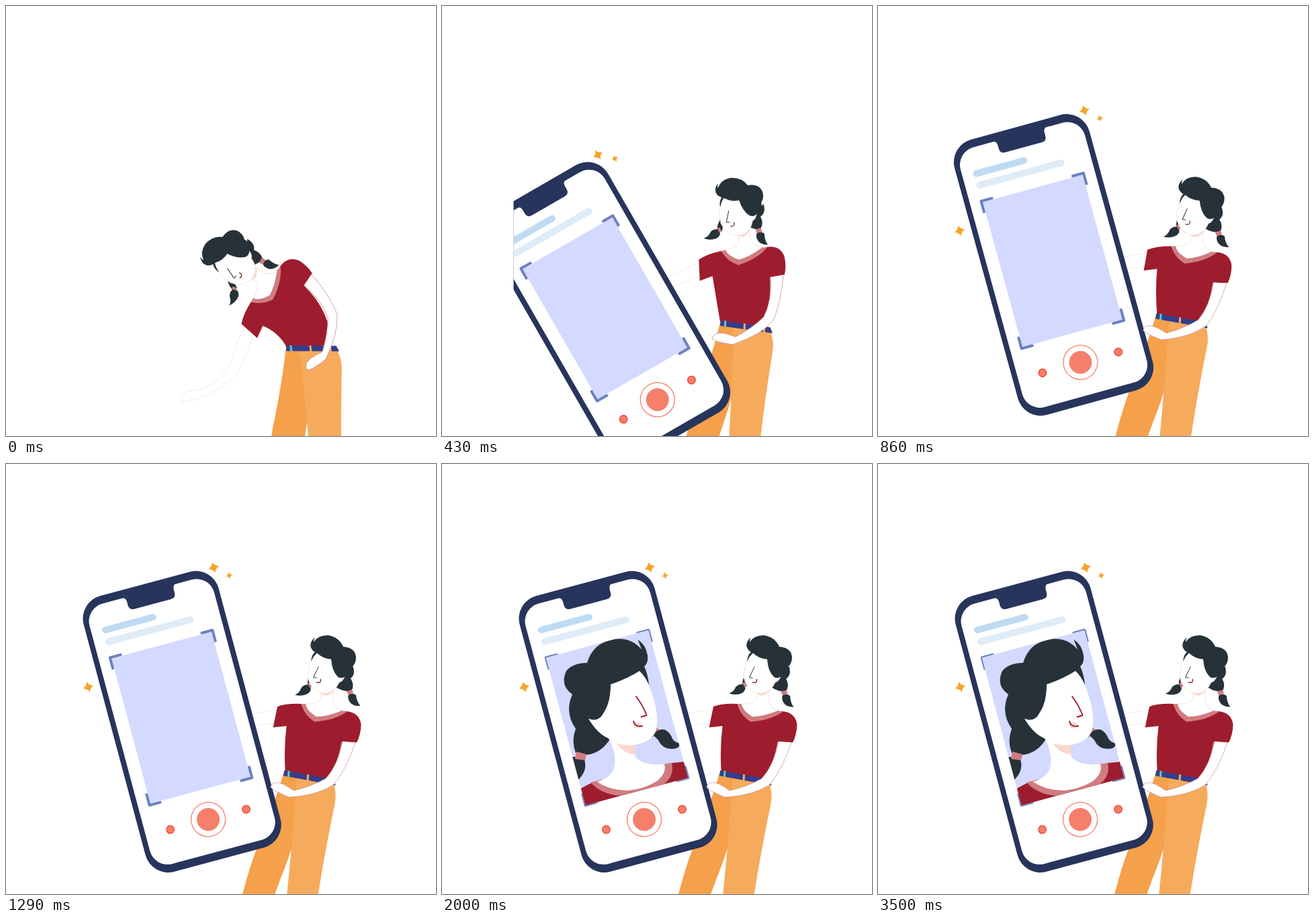
These frames come from a looping animation (640x640 px, 3570 ms). An HTML page:

```html
<!DOCTYPE html>
<html lang="en">
<head>
<meta charset="utf-8">
<title>Selfie</title>
<style>
html, body { margin: 0; height: 100%; overflow: hidden; background: #fff; }
svg { display: block; width: 100vw; height: 100vh; }
.hair { fill: #263238; }
.red { fill: #9d1d2e; }
.pink { fill: #d07c80; }
.peach { fill: #fad7cc; }
.skin { fill: #fff; stroke: #f6d3cb; stroke-width: .6; }
.line { fill: none; stroke-linecap: round; stroke-linejoin: round; }
</style>
</head>
<body>
<svg viewBox="0 0 640 640">
  <defs>
    <clipPath id="left"><rect x="106.5" width="534" height="640"/></clipPath>
    <clipPath id="frame"><rect x="-79" y="-270.5" width="158" height="227.5" transform="translate(301 529) rotate(-15)"/></clipPath>
    <path id="star" d="M0-8Q1.5-2.5 8 0Q2.5 1.5 0 8Q-1.5 2.5-8 0Q-2.5-1.5 0-8Z" fill="#f5a428"/>
  </defs>

  <g class="chest">
    <path fill="#fff" stroke="#f8e4e2" stroke-width=".8" d="M403 366Q370 370 350 376Q318 379 290 359L278 343L269 337L259 343L277 363Q318 396 350 392L397 386"/>
    <path id="shirt" class="red"/>
    <path class="pink" d="M440.5 357Q442 372 459 383.5Q488 382 507 369L500 367Q478 376 462 376Q447 367 446 357Z"/>
    <path class="line" stroke="#f3d5d3" stroke-width=".7" d="M469 343Q472 358 446 357M488 337Q481 362 501 367"/>
    <path class="peach" d="M468 340Q472 346 479 344Q487 341 489 335Z"/>
    <g id="tailL">
      <path class="hair" d="M453 312Q448 321 449 329L456 331L458 318Z"/>
      <path class="hair" d="M452.5 330Q456 337 449 342Q440 346.5 430 343.5Q437 341 439.5 333Q446 326 452.5 330Z"/>
      <path class="pink" d="M449 327L452 325L456 331L452.5 333Z"/>
    </g>
    <g id="tailR">
      <path class="hair" d="M516 300Q521 313 513 319Q519.5 329 514 338L507 338Q498 337 489 331Q499 325 503 314Z"/>
      <path class="hair" d="M510 343Q516 340 521 344Q522 354 527.5 360Q515 361 511 353Q508 348 510 343Z"/>
      <path class="pink" d="M507 338.5L515 335.5L517 341L509.5 344Z"/>
    </g>
    <path class="skin" d="M460 279Q449 298 449 317Q453 339 474 341.5Q489 341 496 325Q501 324 504 317L484 285Z"/>
    <path class="hair" d="M459.5 258Q452 265 453.5 272Q455 277 460 280Q454 285 454.5 294Q457 286 463 281.5Q472 290 484 290.5Q485 308 494 317Q501 321 507 314Q516 310 515 302Q521 297 521 287Q519 273 502 272Q496 258 480 255Q465 254 458 265Q458 261 459.5 258Z"/>
    <path class="line" stroke="#2a3156" d="M465 302L457.5 317.5L462 318.5"/>
    <path class="line" stroke="#7c1d2c" stroke-width="1.3" d="M462 325Q469 327 468.5 320.5"/>
  </g>

  <g id="legs">
    <path fill="#f5a04a" d="M413 460L436 465L432 545Q425 575 416 598Q405 626 393 660L347 660Q360 606 374 570Q400 505 413 460Z"/>
    <path fill="#f6aa5c" d="M433 465L487 475Q493 490 489 508Q470 600 462 660L416 660Q424 590 433 465Z"/>
    <path fill="#343d8c" d="M414 456L487.5 469.5L490.5 478.5L413 464Z"/>
    <path fill="#5dc7b5" d="M419.5 456.5L422.5 457L422 466L418.8 465.4Z"/>
    <path fill="#f6aa5c" d="M448 461.8L451 462.4L450.5 471.6L447.4 471ZM477 467L480 467.6L479.5 477L476.4 476.4Z"/>
  </g>

  <g clip-path="url(#left)">
    <g id="phone">
      <g transform="translate(301 529) rotate(-15)">
        <rect x="-104" y="-363" width="208" height="425" rx="35" fill="#27345c"/>
        <rect x="-96" y="-351" width="192" height="401" rx="27" fill="#fff"/>
        <path fill="#27345c" d="M-41-352q8 0 8 8v5q0 8 8 8h56q8 0 8-8v-5q0-8 8-8z"/>
        <g class="line" stroke-width="10">
          <path stroke="#bfdbf2" d="M-75-312H-1.5"/>
          <path stroke="#deecf7" d="M-74.5-294H51"/>
        </g>
        <rect x="-77" y="-268.5" width="154" height="223.5" fill="#d4d9ff"/>
        <path class="line" stroke="#6b82c0" stroke-width="4" d="M-79-254v-16.5h16.5M62.5-270.5H79v16.5M79-59.5V-43H62.5M-62.5-43H-79v-16.5"/>
        <g fill="#f67f6c">
          <circle r="25.5" fill="none" stroke="#f67f6c" stroke-width="1.3"/>
          <circle r="17"/>
          <g stroke="#f0402f" stroke-width="1.3"><circle cx="-58.5" r="5.8"/><circle cx="58.5" r="5.8"/></g>
        </g>
        <use href="#star" x="105" y="-360"/>
        <use href="#star" x="-121.5" y="-236.5"/>
        <use href="#star" transform="translate(124 -342.5) scale(.62)"/>
      </g>
    </g>
  </g>

  <g id="photo" clip-path="url(#frame)">
    <path fill="#d4d9ff" d="M100 200H420V560H100Z"/>
    <path class="red" d="M200 487Q213 479 224 474L342 445L362 443L375 470L210 515Z"/>
    <path class="pink" d="M221 474Q245 500 290 492Q350 480 342 445L325 447Z"/>
    <path fill="#fff" d="M249 409Q259 430 257 447Q256 465 231 473Q250 486 277 486Q300 484 320 472Q335 460 331 446.5Q300 450 288 436Q284 428 287 415Z"/>
    <path class="peach" d="M259 415Q271 432 288 432L287 415Z"/>
    <path class="pink" d="M310 404L318 391L323 395L314 407Z"/>
    <path class="hair" d="M315 404Q320 393 332 395.5Q340 400 343 409Q348 416 354.5 415Q354 424 342 424Q328 424 322 411Z"/>
    <path class="hair" d="M199 436L212 440Q217 456 203 470L194 470V436Z"/>
    <path class="hair" d="M291.5 261.5Q303 268 306 285Q307 297 301 301Q307 315 308 329L293 318L251 328Q252 355 238 374L249 411Q235 432 213 433L199 430Q192 412 199 394Q182 370 194 343Q175 330 185 308Q195 296 216 296Q225 265 258 260.5Q282 258 297 276Q294 268 291.5 261.5Z"/>
    <path class="pink" d="M200 428L215 432L213 441L198 439Z"/>
    <path fill="#fff" d="M251 328Q275 320 294 308Q303 317 308 329Q324 370 319 395Q312 415 287 418Q262 421 247 408Q231 401 218 379Q232 385 241 371Q251 355 251 328Z"/>
    <ellipse class="peach" cx="291" cy="389" rx="6" ry="4.5"/>
    <path class="line" stroke="#9d1d2e" stroke-width="1.9" d="M289 346Q300 361 304.5 374L296.5 376.5M285 383Q287 392 298 390"/>
  </g>

  <g class="chest">
    <path fill="#fff" stroke="#cb8790" stroke-width=".7" d="M501 413Q494 448 476 468Q455 480 428 486Q412 474 402 474Q394 476 394 481Q397 486 421 496Q465 493 488 477Q506 455 520 415"/>
  </g>
</svg>
<script>
const $ = id => document.getElementById(id);
const LOOP = 3570, STEP = LOOP / 50;
const chest = document.querySelectorAll('.chest');

// Share of the way still to go, from 1 down to 0.
const left = (t, span, power) => t > 1140 ? 0 : Math.exp(-((t / span) ** power));
const clamp = v => Math.min(1, Math.max(0, v));
const move = (el, value) => el.setAttribute('transform', value);

// Turns a point of the shirt about the waist.
function turn(x, y, deg) {
  const a = deg * Math.PI / 180, dx = x - 434.6, dy = y - 440;
  const c = Math.cos(a), s = Math.sin(a);
  return `${434.6 + dx * c - dy * s} ${440 + dx * s + dy * c}`;
}

// The hem stays with the hips while the chest leans.
const shirt = twist => `M404 361Q418 356 440 357Q443 372 460 380Q488 378 505 368
  Q526 369 528.5 388Q528 403 522 414.5L500 413
  Q${turn(494, 444, twist / 2)} ${turn(480, 475, twist)}L${turn(416, 463, twist)}
  Q${turn(413, 425, twist / 2)} 417.5 390L397.5 392Z`;

function draw(t) {
  const bend = left(t, 325.5, 1.291), lift = left(t, 354, 1.854);
  const arc = bend * (1 - bend);
  move($('legs'), `translate(${4 * bend} ${46 * bend}) rotate(${-10.3 * bend} 433 465)`);
  const lean = `translate(${4 * bend - 16 * arc} ${46 * bend - 24 * arc}) rotate(${-60 * bend} 432.5 444)`;
  chest.forEach(el => move(el, lean));
  $('shirt').setAttribute('d', shirt(49.7 * bend));

  const swing = Math.PI * Math.max(0, t - 1300) / 1400;
  const sway = 4.4 * (1 - Math.cos(swing)) + 20 * clamp(4 * bend);
  move($('tailL'), `rotate(${sway} 458 305)`);
  move($('tailR'), `rotate(${sway} 502 308)`);

  move($('phone'), `translate(0 ${170 * lift ** 5}) rotate(${-62 * lift} 527.5 482)`);
  $('photo').setAttribute('opacity', clamp((t - 1500) / 400));
}

const start = performance.now();
function tick() {
  const t = (performance.now() - start) % LOOP;
  draw(Math.floor((t + 5) / STEP) % 50 * STEP);
  requestAnimationFrame(tick);
}
tick();
</script>
</body>
</html>
```
